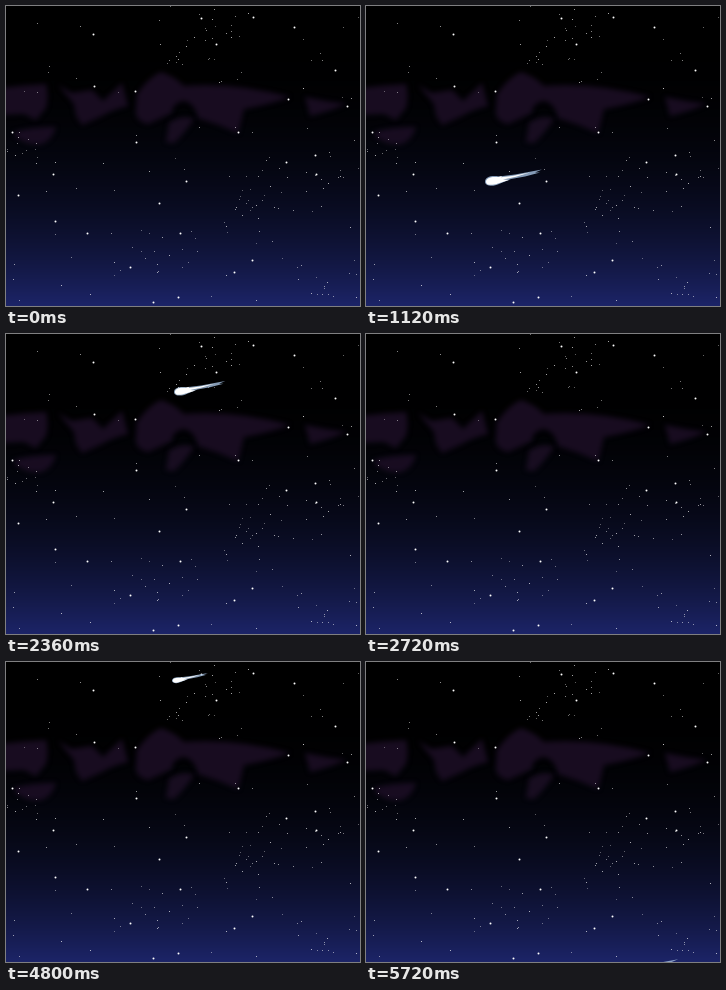
Recreate the animation shown at these times as an HTML page with a canvas. Size 354 by 300 pixels, loop 5.76 s.

```html
<!DOCTYPE html>
<html lang="en">
<head>
<meta charset="utf-8">
<title>Night sky with comets</title>
<style>
  html, body { margin: 0; width: 100%; height: 100%; overflow: hidden; background: #000; }
  canvas { display: block; }
</style>
</head>
<body>
<canvas id="stage" width="354" height="300"></canvas>
<script>
const W = 354, H = 300, LOOP = 5760, STEP = 40, SLOPE = .23;
const ctx = document.getElementById('stage').getContext('2d');

// Seeded random numbers keep the faint stars fixed
let seed = 7;
const rnd = () => (seed = (seed * 16807) % 2147483647) / 2147483647;
const spread = r => (rnd() + rnd() - 1) * r;

const brightStars = [
  [87, 28], [195, 12], [247, 11], [288, 21], [210, 38], [329, 64], [88, 80], [129, 85],
  [282, 93], [341, 100], [232, 126], [130, 136], [6, 126], [47, 168], [12, 189], [49, 215],
  [81, 227], [124, 261], [153, 197], [180, 175], [174, 227], [246, 254], [228, 266],
  [172, 291], [147, 296], [280, 156], [309, 149], [310, 168]
];

// Centres of the denser patches of faint stars
const patches = [[212, 18], [180, 55], [18, 140], [305, 165], [240, 198], [148, 250], [322, 275]];

const nebulae = [
  'M-6 82Q20 79 40 78Q43 90 40 102L30 114L18 108L-6 109Z',
  'M8 126Q24 121 50 121Q46 134 36 138Q22 140 10 131Z',
  'M52 79L66 87L86 84L97 95L116 77L122 100Q106 104 98 109L76 119L70 110L68 98Z',
  'M131 88Q144 70 155 66Q168 70 178 80Q230 76 284 91Q262 99 238 103L232 127Q212 118 192 112Q188 95 176 95Q166 98 166 107L142 118Q128 114 130 104Z',
  'M160 136L163 117Q176 108 188 113Q178 128 168 137Z',
  'M299 91Q318 95 340 98Q322 106 304 110Z'
];

function paintSky() {
  const sky = document.createElement('canvas');
  sky.width = W;
  sky.height = H;
  const c = sky.getContext('2d');

  for (let y = 0; y < H; y++) {
    const k = Math.max(0, (y - 20) / 280) ** 2.6;
    c.fillStyle = `rgb(${28 * k},${36 * k},${104 * k})`;
    c.fillRect(0, y, W, 1);
  }

  c.filter = 'blur(2.4px)';
  c.fillStyle = 'rgba(27,14,36,.9)';
  nebulae.forEach(d => c.fill(new Path2D(d)));
  c.filter = 'none';

  const star = (x, y, r, a) => {
    c.fillStyle = `rgba(255,255,255,${a})`;
    c.beginPath();
    c.arc(Math.floor(x) + .5, Math.floor(y) + .5, r, 0, 7);
    c.fill();
  };
  const faint = (x, y) => star(x, y, .55, .4 + rnd() * .4);
  for (const [x, y] of patches)
    for (let i = 0; i < 15; i++) faint(x + spread(42), y + spread(28));
  for (let i = 0; i < 75; i++) faint(rnd() * W, rnd() * H);
  for (const [x, y] of brightStars) star(x, y, 1, 1);
  return sky;
}

const glow = new Path2D('M0 1C0-4 6-5.5 14-4.5L30-6.5L57-11.5L50-8.5L55-8.5L40-4.5L26-2L14 3C8 6 0 5 0 1Z');
const core = new Path2D('M1 1C1-3 6-4.5 13-3.8L17-5L16-3.6L27-5L45-8.5L30-4L18-1.5L24-1L13 2.5C6 5 1 4 1 1Z');

// Start position, speed to the left and its gain per step
const comets = [
  { start: 800, x: 339, y: 124.3, speed: 27.5, size: 1 },
  { start: 2120, x: 291, y: 29, speed: 18.4, gain: .35, size: .9 },
  { start: 4240, x: 345.5, y: 252, speed: 25.4, size: .8 },
  { start: 4600, x: 256, y: -2.5, speed: 18, size: .63 },
  { start: 5560, x: 350, y: 287, speed: 23, size: .95 }
];

function drawComet({ start, x, y, speed, gain = 0, size }, t) {
  const n = Math.floor((t - start) / STEP);
  if (n < 0 || n > 16) return;
  const path = speed * n + gain * n * n;
  ctx.save();
  ctx.translate(x - path, y + path * SLOPE);
  ctx.scale(size, size);
  ctx.fillStyle = 'rgba(165,193,224,.8)';
  ctx.fill(glow);
  ctx.fillStyle = '#fff';
  ctx.fill(core);
  ctx.restore();
}

const sky = paintSky();

function frame() {
  const t = performance.now() % LOOP;
  ctx.drawImage(sky, 0, 0);
  comets.forEach(c => drawComet(c, t));
  requestAnimationFrame(frame);
}
frame();
</script>
</body>
</html>
```
